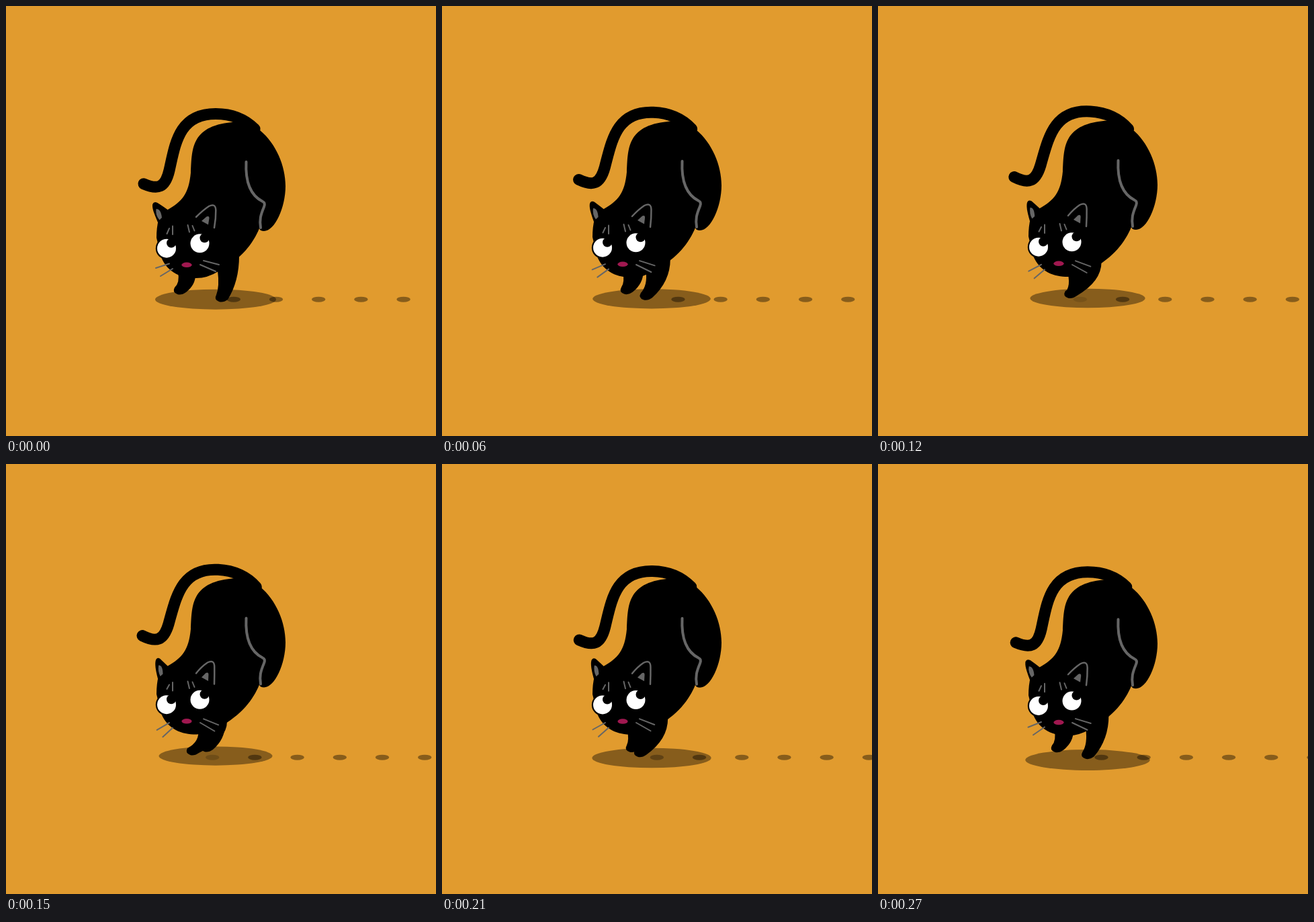
These frames come from a looping animation (640x640 px, 300 ms). An HTML page with a canvas:

```html
<!DOCTYPE html>
<html lang="en">
<head>
<meta charset="utf-8">
<title>Walking cat</title>
<style>
html, body { margin: 0; height: 100%; overflow: hidden; background: #e19b2e; }
canvas { display: block; width: 640px; height: 640px; }
</style>
</head>
<body>
<canvas id="stage" width="640" height="640"></canvas>
<script>
const ctx = document.getElementById('stage').getContext('2d');
const GREY = '#666';
const STEP = 30, STEPS = 10;

const BODY = new Path2D(`M241 303 C262 291 272 280 275 248 C277 215 274 179 336 173
  C352 170 370 178 378 185 C402 205 416 238 416 268 C416 300 400 335 384 335
  Q378 335 377 331 C368 353 351 376 316 395 Q300 405 283 405
  C262 405 241 398 231 374 L224 345 Q224 330 227 318 Z`);
const TAIL = new Path2D(`M205 265 C226 274 237 271 243 245 C252 205 257 160.5 312 160.5
  C338 160.5 356 169 370 183`);
const HAUNCH = new Path2D('M357.5 232 C356 262 364 282 382 291 Q386.5 293 384 299 C379 311 377 318 379 330');

const mix = (a, b, k) => a + (b - a) * k;

function ellipse(x, y, rx, ry, color) {
  ctx.fillStyle = color;
  ctx.beginPath();
  ctx.ellipse(x, y, rx, ry, 0, 0, 2 * Math.PI);
  ctx.fill();
}

function line(x1, y1, x2, y2) {
  ctx.lineWidth = 2;
  ctx.beginPath();
  ctx.moveTo(x1, y1);
  ctx.lineTo(x2, y2);
  ctx.stroke();
}

// A limb that tapers from its two root corners to a rounded paw.
function drawLeg(leftX, leftY, rightX, rightY, pawX, pawY) {
  const heelX = pawX + 10, heelY = pawY + 4;
  ctx.fillStyle = '#000';
  ctx.beginPath();
  ctx.moveTo(rightX, rightY);
  ctx.quadraticCurveTo(rightX, mix(rightY, heelY, 0.58), heelX, heelY);
  ctx.quadraticCurveTo(pawX + 3, pawY + 9, pawX - 3, pawY + 7);
  ctx.quadraticCurveTo(pawX - 11, pawY + 4, pawX - 7, pawY - 3);
  ctx.quadraticCurveTo(leftX + 3, mix(leftY, pawY, 0.6), leftX, leftY);
  ctx.fill();
}

function drawLegs(tuck) {
  const at = (stretched, tucked) => mix(stretched, tucked, tuck);
  drawLeg(at(256, 289), 396, at(282, 326), at(400, 388), at(258, 298), at(422, 421));
  drawLeg(at(315, 286), 394, at(347, 329), at(372, 383), at(320, 277), at(433, 426));
}

function drawGround(i) {
  const falling = i <= 5;
  const cy = falling ? 436.7 - 0.43 * i : 434.5 + 1.5 * (i - 5);
  const rx = falling ? 90 - 1.1 * i : 84.5 + 2.05 * (i - 5);
  ellipse(312, cy, rx, rx / 6, 'rgba(0,0,0,.4)');
  for (let n = -1; n < 5; n++) {
    const fade = n < 0 ? Math.max(0, Math.min(1, (i - 2) / 7)) : 1;
    ellipse(338.8 + 63.2 * n + 6.32 * i, 436.7, 10.2, 4, `rgba(0,0,0,${0.4 * fade})`);
  }
}

function drawTail(i) {
  const lift = 4.9 - 5.7 * Math.cos(2 * Math.PI * (i + 1) / STEPS);
  ctx.save();
  ctx.translate(370, 225);
  ctx.rotate(lift / 168);
  ctx.translate(-370, -225);
  ctx.strokeStyle = '#000';
  ctx.lineWidth = 17;
  ctx.stroke(TAIL);
  ctx.restore();
}

function drawEye(x, y) {
  ellipse(x, y, 16.2, 16.2, '#000');
  ellipse(x, y, 14, 14, '#fff');
  ellipse(x + 7, y - 8, 7, 7, '#000');
}

function drawEars(dip) {
  const e = 5.5 * dip, r = -2.5 * dip;
  ctx.fillStyle = '#000';
  ctx.fill(new Path2D(`M226 322 C${220 + e / 2} 308 ${217 + e} 300 ${218.2 + e} 295
    Q${220 + e} ${290.5 - dip} ${225.5 + e * 0.8} ${293 - dip} Q${232 + e / 2} 297 241 303.5 L245 325 Z`));
  ctx.fillStyle = GREY;
  ctx.fill(new Path2D(`M${223.5 + e * 0.8} 302 Q${230.5 + e * 0.6} 302 ${232 + e / 3} 315
    L${228.5 + e / 4} 318.5 Q${222 + e * 0.8} 311 ${223.5 + e * 0.8} 302 Z`));
  ctx.fill(new Path2D(`M291 320 L${298.5 + r / 2} 313.5 Q${302.5 + r / 2} 311.5 ${302.5 + r / 2} 316 L301 325.5 Z`));
  ctx.lineWidth = 2.5;
  ctx.stroke(new Path2D(`M283 314 Q${293 + r} 304 ${302 + r} 298 Q${312 + r} 293 ${312.3 + r} 304
    Q${312.5 + r} 316 310 330`));
}

function drawFace(dip) {
  line(243, 331, 239.5, 339 - 2 * dip);
  line(248, 327.5, 248, 340);
  line(270.5, 326, 273, 336.5);
  line(277.5, 327, 280.5, 334.5);
  drawEye(239, 360.7);
  drawEye(288.5, 353.3);
  ellipse(269, 385.3, 7.6, 3.7, '#a01850');
  line(223 + 2 * dip, 390 + 10 * dip, 243, 383.5 + 5 * dip);
  line(230 + 4 * dip, 402 + 8 * dip, 248, 391 + 5 * dip);
  line(294, 379 + 3.5 * dip, 317 - dip, 385 + 7 * dip);
  line(289, 385 + 3 * dip, 312 - 2 * dip, 395 + 6 * dip);
}

function drawCat(i) {
  const tuck = Math.min(i, STEPS - i) / 5;
  const dip = i <= 6 ? i / 6 : (STEPS - i) / 4;
  drawTail(i);
  drawLegs(tuck);
  ctx.save();
  ctx.translate(0, -3 * dip);
  ctx.fillStyle = '#000';
  ctx.fill(BODY);
  ctx.strokeStyle = GREY;
  ctx.lineWidth = 4;
  ctx.stroke(HAUNCH);
  drawEars(dip);
  drawFace(dip);
  ctx.restore();
}

function render(now) {
  const i = Math.floor(now / STEP) % STEPS;
  ctx.fillStyle = '#e19b2e';
  ctx.fillRect(0, 0, 640, 640);
  ctx.lineCap = ctx.lineJoin = 'round';
  drawGround(i);
  drawCat(i);
}

const start = performance.now();
function tick() {
  render(performance.now() - start);
  requestAnimationFrame(tick);
}
tick();
</script>
</body>
</html>
```
